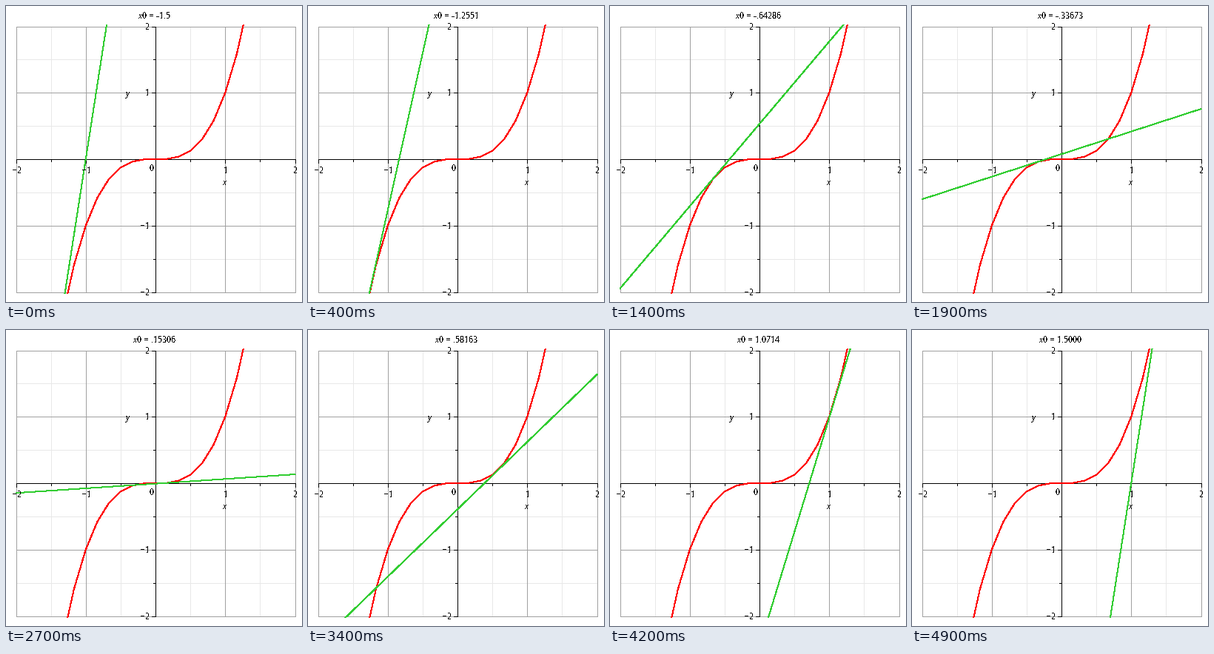
Recreate the animation shown at these times as a matplotlib script. Size 400 px wide and 400 px high, loop 5 s.

```python
import matplotlib.pyplot as plt
import numpy as np
from matplotlib.animation import FuncAnimation
from matplotlib.patches import Rectangle

SIZE, DPI, FRAMES = 400, 80, 50
PT = 72 / DPI  # points per pixel
CX, CY, UX, UY = 202.5, 207.5, 94.25, 89.75

plt.rcParams.update({
    "font.family": "Liberation Serif",
    "text.antialiased": False,
    "text.hinting": "native",
    "text.hinting_factor": 1,
})

fig = plt.figure(figsize=(SIZE / DPI, SIZE / DPI), dpi=DPI, facecolor="white")
ax = fig.add_axes([0, 0, 1, 1])
ax.set_xlim(0, SIZE)
ax.set_ylim(SIZE, 0)
ax.axis("off")


def px(x):
    return CX + UX * np.asarray(x)


def py(y):
    return CY - UY * np.asarray(y)


def rule(xs, ys, color, z):
    """One-pixel line through pixel centres."""
    ax.plot(xs, ys, color=color, lw=PT, zorder=z, snap=False,
            solid_capstyle="projecting")


def pixel(v):
    return np.floor(v) + 0.5


def label(x, y, text, ha="center", **style):
    return ax.text(x, y, text, ha=ha, va="baseline", fontsize=12 * PT,
                   color="black", zorder=8, **style)


def curve(color, z):
    # Without antialiasing every touched pixel is filled, so this is two wide.
    line, = ax.plot([], [], color=color, lw=PT, zorder=z, snap=False,
                    antialiased=False)
    line.set_clip_path(Rectangle((13, 25), 379, 364, transform=ax.transData))
    return line


def set_curve(line, x, y):
    line.set_data(px(x) - 0.5, py(y) - 0.5)


left, right, top, bottom = 14.5, 391.5, 28.5, 387.5
for half in range(-4, 5):
    if half == 0:
        continue
    major = half % 2 == 0
    gx, gy = pixel(px(half / 2)), pixel(py(half / 2))
    color, z = ("#a0a0a0", 2) if major else ("#e8e8e8", 1)
    rule([gx, gx], [top, bottom], color, z)
    rule([left, right], [gy, gy], color, z)
    tick = 5 if major else 3
    rule([gx, gx], [CY, CY + tick], "black", 3)
    rule([CX - tick, CX], [gy, gy], "black", 3)
    if major:
        text = str(half // 2).replace("-", "\u2212")
        label(gx, 226, text)
        label(194, gy + 3.5, text, ha="right")

rule([left, right], [CY, CY], "black", 3)
rule([CX, CX], [top, bottom], "black", 3)
label(196.5, 223, "0")
label(296, 242, "x", style="italic")
label(164.5, 122, "y", style="italic")

cubic = curve("#ff0000", 4)
xs = np.linspace(-2, 2, 25)
set_curve(cubic, xs, xs ** 3)
tangent = curve("#32cd32", 5)
title = label(200.5, 17, "")


def five_digits(value):
    """Five significant digits without a leading zero."""
    sign, size = ("-" if value < 0 else ""), abs(value)
    if size >= 1:
        return f"{sign}{size:.4f}"
    if size >= 0.1:
        return sign + f"{size:.5f}"[1:]
    return sign + f"{size * 10:.5f}"[1:] + "e-1"


def update(i):
    x0 = -1.5 + 3 * i / (FRAMES - 1)
    ends = np.array([-2, 2])
    set_curve(tangent, ends, x0 ** 3 + 3 * x0 ** 2 * (ends - x0))
    title.set_text("x0 = " + (five_digits(x0) if i else "-1.5"))
    return tangent, title


anim = FuncAnimation(fig, update, frames=FRAMES, interval=100,
                     repeat=True, repeat_delay=0)
plt.show()
```
